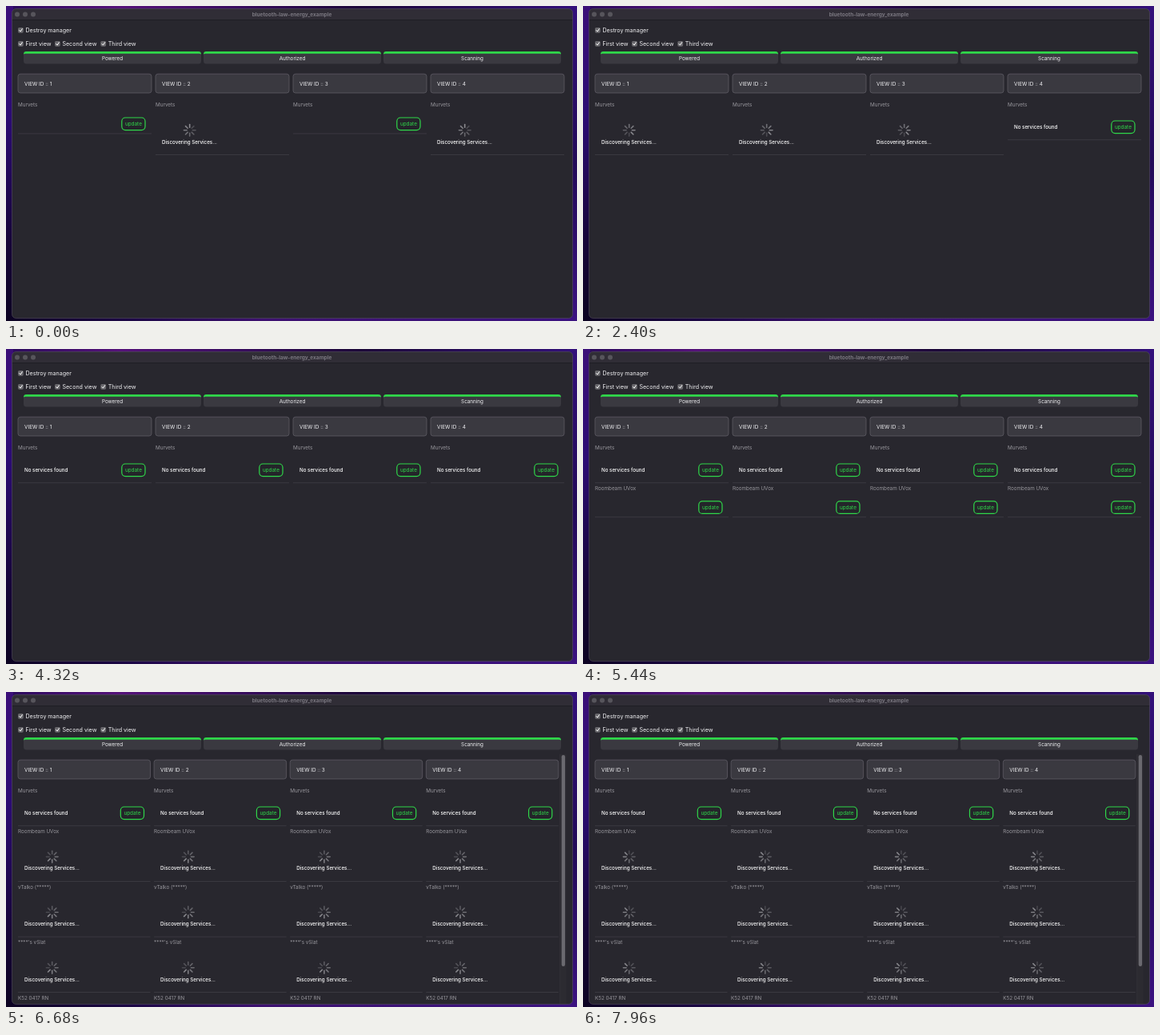
These frames come from a looping animation (714 px wide and 395 px high, 8000 ms). An HTML page:

```html
<!DOCTYPE html>
<html lang="en">
<head>
<meta charset="utf-8">
<title>bluetooth-law-energy_example</title>
<style>
  html, body { margin: 0; width: 100%; height: 100%; overflow: hidden; background: #1a0844; }
  svg { display: block; width: 714px; height: 395px; font-family: Inter, Roboto, sans-serif; }
</style>
</head>
<body>
<svg viewBox="0 0 714 395">
  <defs>
    <linearGradient id="top">
      <stop offset="0" stop-color="#2a0a5c"/><stop offset=".2" stop-color="#56127a"/>
      <stop offset=".4" stop-color="#3a0d60"/><stop offset=".62" stop-color="#1c0838"/>
      <stop offset="1" stop-color="#33107a"/>
    </linearGradient>
    <linearGradient id="left" x2="0" y2="1">
      <stop offset="0" stop-color="#3b0f78"/><stop offset=".35" stop-color="#2c0c74"/>
      <stop offset=".75" stop-color="#160538"/><stop offset="1" stop-color="#0c0322"/>
    </linearGradient>
    <linearGradient id="right" x2="0" y2="1">
      <stop offset="0" stop-color="#33107a"/><stop offset=".5" stop-color="#220a58"/>
      <stop offset="1" stop-color="#3b1280"/>
    </linearGradient>
    <linearGradient id="bottom">
      <stop offset="0" stop-color="#0c0322"/><stop offset=".22" stop-color="#1c0746"/>
      <stop offset=".45" stop-color="#3d1070"/><stop offset="1" stop-color="#3b1280"/>
    </linearGradient>
    <clipPath id="win"><rect x="7.5" y="3.5" width="701" height="388" rx="5"/></clipPath>
  </defs>
  <rect width="714" height="5" fill="url(#top)"/>
  <rect width="9" height="395" fill="url(#left)"/>
  <rect x="706" width="8" height="395" fill="url(#right)"/>
  <rect y="390" width="714" height="5" fill="url(#bottom)"/>
  <g clip-path="url(#win)">
    <rect width="714" height="395" fill="#28272e"/>
    <rect width="714" height="17" fill="#302d36"/>
    <rect y="17" width="714" height=".7" fill="#1b1a20"/>
    <g id="bar"></g>
    <g id="views"></g>
  </g>
  <rect x="7.5" y="3.5" width="701" height="388" rx="5" fill="none" stroke="#55505f" stroke-width=".6"/>
</svg>
<script>
const LOOP = 8000, GREEN = '#2fd749', NEVER = 1e9;
const $ = id => document.getElementById(id);

// text centred vertically on y
const text = (x, y, s, size = 6.3, fill = '#f2f2f4', extra = '') =>
  `<text x="${x}" y="${y + size * .36}" font-size="${size}" fill="${fill}" ${extra}>${s}</text>`;
const MID = 'text-anchor="middle"';

const check = (x, y, label) =>
  `<rect x="${x}" y="${y - 3.4}" width="6.8" height="6.8" rx="1.6" fill="#68676c"/>
   <path d="M${x + 1.7} ${y + .2}l1.4 1.6 2.2-3.5" fill="none" stroke="#fff" stroke-width="1" stroke-linecap="round"/>` +
  text(x + 9.4, y, label, 7.1);

const status = (x, label) =>
  `<rect x="${x}" y="57" width="222" height="15.5" rx="3.5" fill="#3a3940"/>
   <path d="M${x} 60.4q0-3.4 3.5-3.4h215q3.5 0 3.5 3.4q-.8-.7-2.5-.7h-217q-1.7 0-2.5.7z" fill="${GREEN}"/>` +
  text(x + 111, 66, label, 6.3, '#f2f2f4', MID);

$('bar').innerHTML =
  [14, 24, 34].map(x => `<circle cx="${x}" cy="10.5" r="3" fill="#57555c"/>`).join('') +
  text(357.5, 10.3, 'bluetooth-law-energy_example', 6.53, '#7b7881', MID + ' font-weight="700"') +
  check(15, 30.3, 'Destroy manager') + check(15, 47.3, 'First view') +
  check(61, 47.3, 'Second view') + check(118.3, 47.3, 'Third view') +
  status(22, 'Powered') + status(247, 'Authorized') + status(472, 'Scanning');

// device: name, time it shows up, and per view when discovery starts and ends
const all = v => [v, v, v, v];
const devices = [
  { name: 'Murvets', shown: -1, start: [80, -1, 80, -1], end: [3320, 2960, 3320, 1000] },
  { name: 'Roombeam UVox', shown: 5440, start: all(5520), end: all(NEVER) },
  { name: 'vTalko (*****)', shown: 5520, start: all(5600), end: all(NEVER) },
  { name: "****'s vSlat", shown: 5600, start: all(5680), end: all(NEVER) },
  { name: 'K52 0417 RN', shown: 6280, start: all(6360), end: all(NEVER) }
];
const SCROLL_AT = 6280;

function spinner(x, y, t) {
  let s = `<g transform="translate(${x} ${y})" stroke="#d8d8dc" stroke-width="1.6" stroke-linecap="round">`;
  for (let i = 0; i < 8; i++) {
    const age = (t / 1000 - i / 8 + 1) % 1;
    s += `<path d="M0-3.6V-7.3" transform="rotate(${i * 45})" opacity="${(.16 + .4 * (1 - age)).toFixed(3)}"/>`;
  }
  return s + '</g>';
}

const button = (right, y) =>
  `<rect x="${right - 29.6}" y="${y - 7.8}" width="29.2" height="15.6" rx="4.5" fill="#24252a" stroke="${GREEN}" stroke-width="1.2"/>` +
  text(right - 15, y, 'update', 6.4, GREEN, MID);

function view(n, t) {
  const scroll = t >= SCROLL_AT;
  const x = 15 + n * (scroll ? 170.1 : 172), w = scroll ? 165.5 : 167, right = x + w - 7.6;
  let s = `<rect x="${x}" y="85.2" width="${w}" height="23.8" rx="3" fill="#3a3940" stroke="#5d5b64" stroke-width=".8"/>` +
    text(x + 8, 97.2, 'VIEW ID :: ' + (n + 1), 6.4);
  let y = 124;
  for (const d of devices) {
    if (t < d.shown) break;
    s += text(x, y, d.name, 6.3, '#98979d');
    let height = 36;
    if (t < d.start[n]) s += button(right, y + 23.8);
    else if (t < d.end[n]) {
      height = 62.6;
      s += spinner(x + 42.7, y + 31.8, t) + text(x + 8, y + 46.4, 'Discovering Services...', 6.25, '#fff', 'font-weight="500"');
    } else {
      height = 43.8;
      s += text(x + 8, y + 28, 'No services found', 6.22, '#fff', 'font-weight="500"') + button(right, y + 27.8);
    }
    s += `<rect x="${x}" y="${y + height - .4}" width="${w}" height=".8" fill="#3f3e45"/>`;
    y += height + 7;
  }
  return s;
}

const scrollbar =
  `<rect x="692.8" y="78" width="8" height="314" fill="#2c2b31"/>
   <rect x="692.6" y="78" width=".5" height="314" fill="#3a3940"/>
   <rect x="694.7" y="79" width="4.4" height="265" rx="2.2" fill="#6a696f"/>`;

function frame(now) {
  const t = now % LOOP;
  $('views').innerHTML = [0, 1, 2, 3].map(n => view(n, t)).join('') + (t >= SCROLL_AT ? scrollbar : '');
  requestAnimationFrame(frame);
}
frame(0);
</script>
</body>
</html>
```
